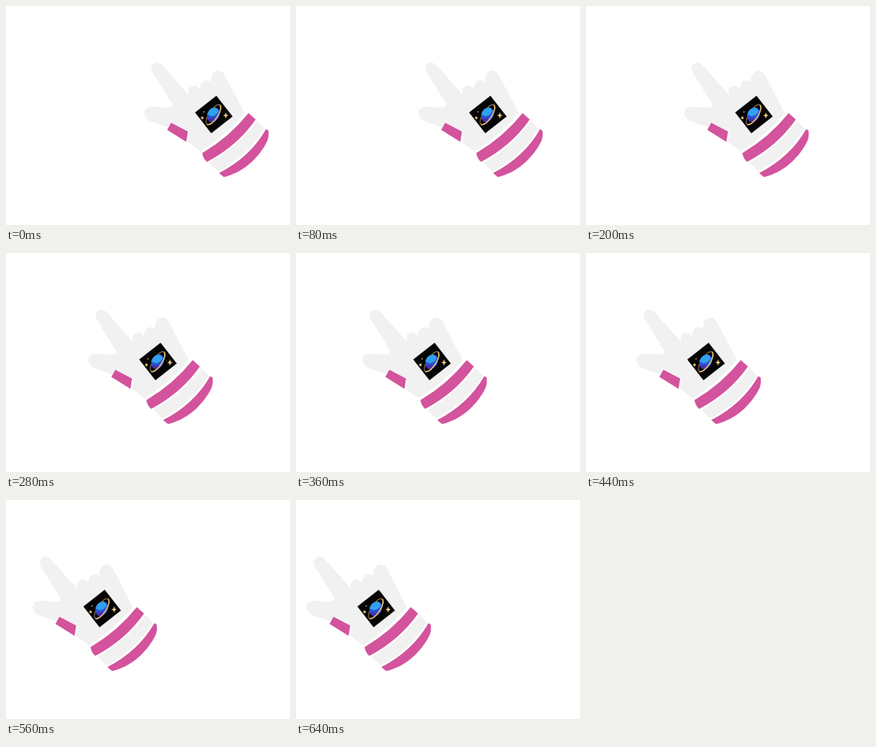
Animation, 356 px wide and 274 px high, one loop 0.68 s. Source, as an HTML page:

```html
<!DOCTYPE html>
<html lang="en">
<head>
<meta charset="utf-8">
<title>Pointing glove</title>
<style>
  html, body { margin: 0; width: 100%; height: 100%; overflow: hidden; background: #fff; }
  svg { display: block; width: 100vw; height: 100vh; }
  .hand { animation: slide 680ms steps(17) infinite; }
  @keyframes slide { to { transform: translateX(-170px); } }
  .glove { fill: #f1f1f1; }
  .trim { fill: #d3539d; }
</style>
</head>
<body>
<svg viewBox="0 0 356 274">
  <g class="hand">
    <g class="glove">
      <!-- fingers, palm and thumb -->
      <path d="M183 82C180 75 186 70 191 71Q195 72 198 76L229 111
        C227 103 232 99 238 100Q241 101 243 104C243 94 250 90 257 95
        C256 85 262 80 268 81Q272 82 275 88L299 134Q277 161 244 182L228 170
        L229 157L207 145L203 152L181 144C172 140 171 130 178 127
        Q186 125 195 127Q205 128 208 125Q209 123 206 119Z"/>
      <path d="M315 144L324 153Q304 187 266 207L255 196Q291 176 315 144Z"/>
    </g>
    <g class="trim">
      <path d="M207 146L228 157L226 170L202 155Z"/>
      <path d="M304 134L313 142Q290 175 252 195Q247 191 246 184Q280 164 304 134Z"/>
      <path d="M326 154L329 156Q330 162 328 168C317 191 296 209 273 214L267 209Q306 189 326 154Z"/>
    </g>
    <!-- space patch -->
    <rect x="-17" y="-16.5" width="34" height="33" fill="#050505" transform="translate(260.5 135.7) rotate(-38)"/>
    <g transform="translate(260 136) rotate(-57)">
      <ellipse rx="14.5" ry="5.5" fill="none" stroke="#8a6a45" stroke-width="1.2"/>
      <ellipse rx="9.5" ry="7.5" fill="#2b50d0"/>
      <path d="M-4 -6.800Q3 -9 8 -4Q10 0 7 3Q1 4 -3 -1Z" fill="#2fa0ee"/>
      <path d="M-8.500 -3.300Q-4 0 -2 7.300Q-12 4 -8.500 -3.300Z" fill="#4a2fae"/>
      <path d="M-14.500 0A14.500 5.500 0 0 0 14.500 0" fill="none" stroke="#e3bd7c" stroke-width="1.500"/>
    </g>
    <g fill="#f3cf87">
      <path d="M275.500 133L276.500 136L279 137L276.500 138L275.500 141L274.500 138L272 137L274.500 136Z"/>
      <path d="M246 137.500L246.800 139.200L248.500 140L246.800 140.800L246 142.500L245.200 140.800L243.500 140L245.200 139.200Z"/>
      <circle cx="248" cy="132.500" r=".8"/>
    </g>
  </g>
</svg>
</body>
</html>
```
